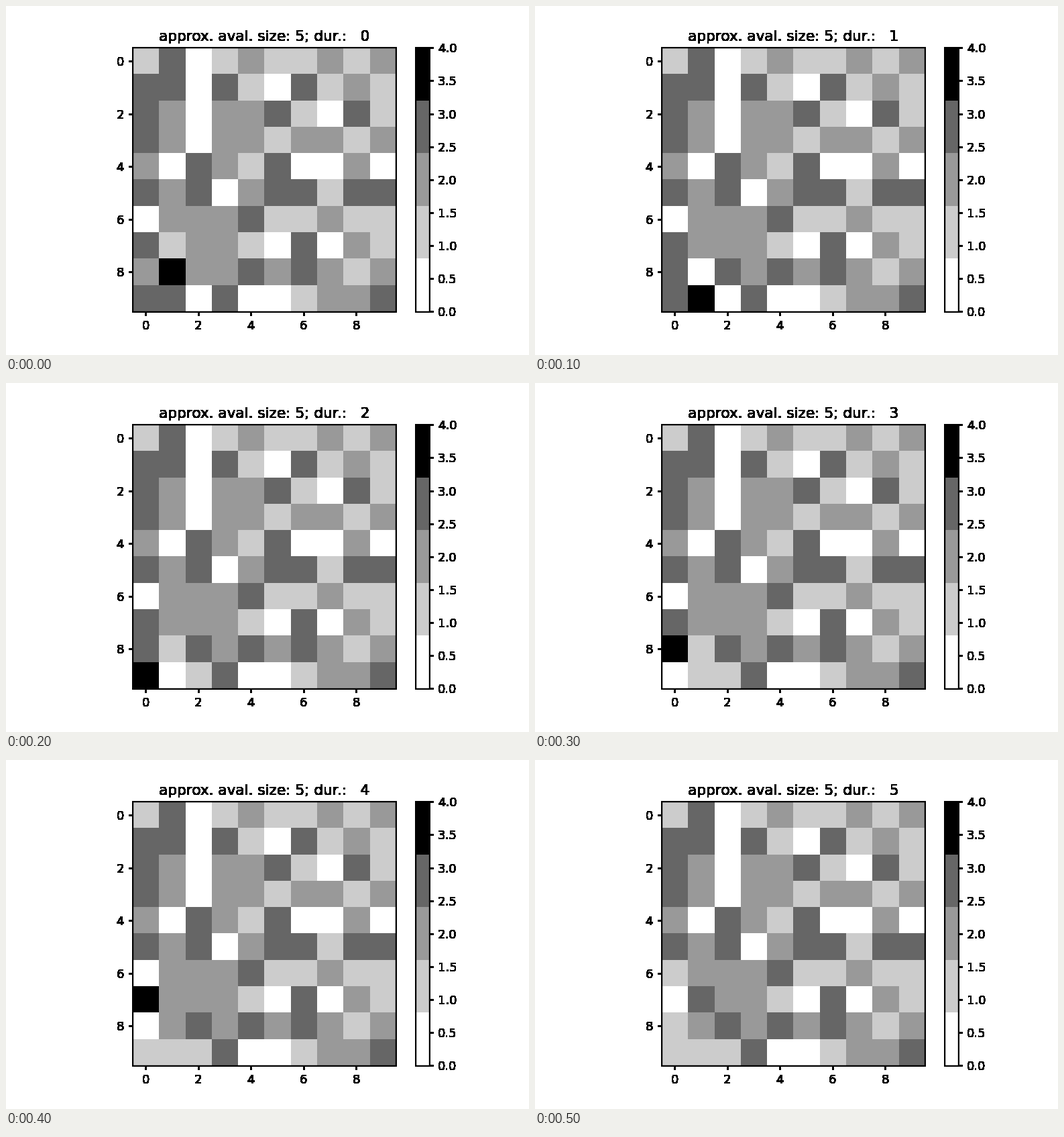
Animation, 780 px wide and 520 px high, one loop 0.6 s. Source, as a matplotlib script:

```python
import numpy as np
import matplotlib.pyplot as plt
from matplotlib.animation import FuncAnimation
from matplotlib.colors import ListedColormap

DPI = 130
TOPPLINGS = 5
CRITICAL = 4

plt.rcParams.update({
    "font.family": "DejaVu Sans",
    "font.size": 10,
    "figure.subplot.bottom": 0.125,
})

START = [
    "1301211212",
    "3303103121",
    "3202231031",
    "3202212212",
    "2032130020",
    "3230233133",
    "0222311211",
    "3122103021",
    "2422323212",
    "3303001223",
]


def topple(pile):
    """Every critical cell passes one grain to each neighbour."""
    hot = (pile >= CRITICAL).astype(int)
    padded = np.pad(hot, 1)
    received = (padded[:-2, 1:-1] + padded[2:, 1:-1]
                + padded[1:-1, :-2] + padded[1:-1, 2:])
    return pile - CRITICAL * hot + received


def harden(image, dpi):
    """Make every touched pixel opaque, for crisp text and lines."""
    image = image.copy()
    image[..., 3] = image[..., 3] > 0
    return image, 0, 0


piles = [np.array([[int(c) for c in row] for row in START])]
for _ in range(TOPPLINGS):
    piles.append(topple(piles[-1]))

fig, ax = plt.subplots(figsize=(780 / DPI, 520 / DPI), dpi=DPI)
greys = ListedColormap(["1.0", "0.8", "0.6", "0.4", "0.0"])
cells = ax.imshow(piles[0], cmap=greys, vmin=0, vmax=CRITICAL,
                  interpolation="nearest")
ax.set_xticks(range(0, 10, 2))
ax.set_yticks(range(0, 10, 2))
title = ax.set_title("")
bar = fig.colorbar(cells, ax=ax, ticks=np.arange(0, 4.5, 0.5))

for axes in (ax, bar.ax):
    axes.set_agg_filter(harden)


def update(step):
    cells.set_data(piles[step])
    title.set_text(f"approx. aval. size: {TOPPLINGS}; dur.: {step:3d}")
    return cells, title


animation = FuncAnimation(fig, update, frames=len(piles), interval=100,
                          repeat=True, repeat_delay=0, blit=False)
plt.show()
```
